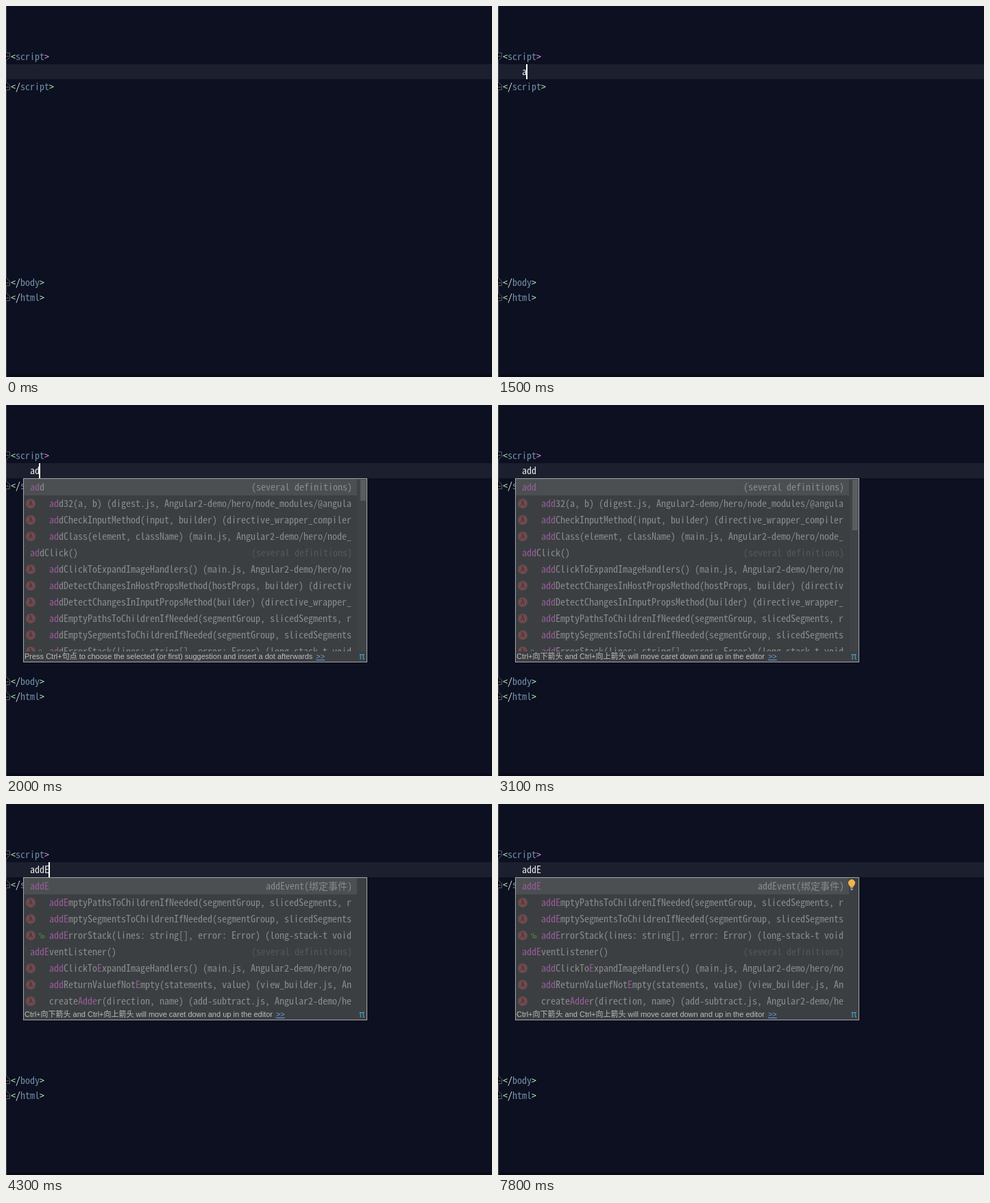
An HTML page that plays this animation: 709x542 px, repeating every 8000 ms.

```html
<!DOCTYPE html>
<html lang="en">
<head>
<meta charset="utf-8">
<title>Code completion</title>
<style>
html, body { margin: 0; width: 100%; height: 100%; overflow: hidden; background: #0c1020; }
#stage {
  position: relative; width: 709px; height: 542px; overflow: hidden; background: #0c1020;
  font: 14px "Noto Sans Mono CJK SC", "Liberation Mono", monospace; white-space: pre;
  font-size-adjust: ch-width 0.5;
}
#stage div, #stage svg { position: absolute; }
.anim, .list, .hint { animation: 8s step-end infinite; }

/* editor */
.current { left: 1px; top: 85px; width: 708px; height: 22px; background: #1c1f2e; }
.gutter { left: 0; top: 0; width: 1px; height: 542px; background: #4c4e55; }
.foot { left: 1px; top: 538px; width: 708px; height: 4px; background: #090b18; }
.line { left: 7px; height: 22px; line-height: 20px; color: #b2f0b0; }
.line b { font-weight: normal; color: #718da5; }
.line i { font-style: normal; color: #e4ece8; }
.line u { text-decoration: none; color: #f48bdd; }
.fold { left: 0; fill: #0c1020; stroke: #5a5c60; }
.typed {
  left: 35px; top: 85px; height: 22px; line-height: 20px; overflow: hidden;
  color: #e8e8e8; animation-name: typing;
}
.caret { left: 34px; top: 85px; width: 2px; height: 22px; background: #fff; animation-name: move, blink; }

/* popup */
.popup {
  left: 25px; top: 107px; width: 502px; height: 269px; box-sizing: border-box; overflow: hidden;
  border: 1px solid #a4a6a7; background: #3c3f41; animation-name: open;
}
.selected { left: 0; top: 0; width: 486px; height: 24px; background: #4b4f51; }
.track { left: 487px; top: 0; width: 13px; height: 252px; background: #404345; animation-name: track; }
.thumb { left: 491px; top: 1px; width: 8px; height: 25px; background: #5a5d5e; animation-name: thumb; }
.list { left: 0; top: 0; width: 486px; height: 252px; overflow: hidden; color: #8a8b8c; }
.row { left: 0; width: 486px; height: 24px; line-height: 22px; }
.row .name { left: 9px; }
.row.fn .name { left: 37px; }
.row b { font-weight: normal; color: #965c9a; }
.row .note { right: 7px; color: #55585a; }
.row:first-child .note { color: #8a8b8c; }
.icon {
  left: 3px; top: 5px; width: 14px; height: 14px; border-radius: 50%; background: #704a4e;
  color: #3a2c2f; font: 10px/14px "DejaVu Sans", sans-serif; text-align: center;
}
.icon.var { background: #8a682f; font-size: 8px; }
.icon.var::before {
  content: ""; position: absolute; left: -1px; top: -1px; width: 5px; height: 5px;
  border-radius: 50%; background: #8b8d8e;
}
.lock { left: 22px; top: 8px; fill: none; stroke: #4d7a45; }
.hints { left: 0; bottom: 0; width: 500px; height: 15px; background: #3c3f41; }
.hint {
  left: 1px; top: 0; color: #bcbcbc;
  font: 11px/15px "Liberation Sans", "Noto Sans CJK SC", "Noto Sans CJK", sans-serif;
}
.hint u { margin-left: 5px; color: #6a9fe8; }
.pi { left: 489px; top: 0; color: #4397c0; font: 14px/14px "DejaVu Sans", sans-serif; }
.bulb { left: 511px; top: 110px; animation-name: bulb; }

#list-a { animation-name: list-a; }
#list-ad { animation-name: list-ad; }
#list-add { animation-name: list-add; }
#list-addE { animation-name: list-addE; }
#hint-dot { animation-name: hint-dot; }
#hint-move { animation-name: hint-move; }

@keyframes typing {
  0% { width: 0; } 18.75% { width: 7px; } 25% { width: 14px; }
  28.75% { width: 21px; } 53.75%, 100% { width: 28px; }
}
@keyframes move {
  0% { left: 34px; } 18.75% { left: 41px; } 25% { left: 48px; }
  28.75% { left: 55px; } 53.75%, 100% { left: 62px; }
}
@keyframes blink {
  0%, 15%, 38.75%, 50%, 62.5%, 73.75%, 86.25%, 97.5%, 100% { opacity: 0; }
  10%, 18.75%, 45%, 53.75%, 67.5%, 80%, 91.25% { opacity: 1; }
}
@keyframes open {
  0% { opacity: 0; height: 269px; } 21.25% { opacity: 1; height: 269px; }
  53.75%, 100% { opacity: 1; height: 209px; }
}
@keyframes track { 0% { opacity: 1; } 53.75%, 100% { opacity: 0; } }
@keyframes thumb {
  0% { height: 25px; } 25% { height: 31px; } 28.75% { height: 74px; } 53.75%, 100% { height: 0; }
}
@keyframes list-a { 0% { opacity: 1; } 25%, 100% { opacity: 0; } }
@keyframes list-ad { 0%, 28.75%, 100% { opacity: 0; } 25% { opacity: 1; } }
@keyframes list-add { 0%, 53.75%, 100% { opacity: 0; } 28.75% { opacity: 1; } }
@keyframes list-addE { 0% { opacity: 0; } 53.75%, 100% { opacity: 1; } }
@keyframes hint-dot { 0% { opacity: 1; } 26.25%, 100% { opacity: 0; } }
@keyframes hint-move { 0% { opacity: 0; } 26.25%, 100% { opacity: 1; } }
@keyframes bulb { 0% { opacity: 0; } 60%, 100% { opacity: 1; } }
</style>
</head>
<body>
<div id="stage">
  <div class="current"></div>
  <div class="gutter"></div>
  <div class="foot"></div>
  <svg class="fold" style="top:67px" width="7" height="14"><path d="M0 1.5H5.5V8L0 13M0 6.5H4"/></svg>
  <svg class="fold" style="top:110px" width="7" height="14"><path d="M0 1L5.5 6V12.5H0M0 8.5H4"/></svg>
  <svg class="fold" style="top:396px" width="7" height="14"><path d="M0 1L5.5 6V12.5H0M0 8.5H4"/></svg>
  <svg class="fold" style="top:418px" width="7" height="14"><path d="M0 1L5.5 6V12.5H0M0 8.5H4"/></svg>
  <div class="line" style="top:63px">&lt;<b>script</b><u>&gt;</u></div>
  <div class="line" style="top:107px">&lt;<i>/</i><b>script</b>&gt;</div>
  <div class="line" style="top:393px">&lt;<i>/</i><b>body</b>&gt;</div>
  <div class="line" style="top:415px">&lt;<i>/</i><b>html</b>&gt;</div>
  <div class="typed anim">addE</div>
  <div class="caret anim"></div>

  <div class="popup anim">
    <div class="selected"></div>
    <div class="track anim"></div>
    <div class="thumb anim"></div>
    <div class="list" id="list-a"></div>
    <div class="list" id="list-ad"></div>
    <div class="list" id="list-add"></div>
    <div class="list" id="list-addE"></div>
    <div class="hints">
      <div class="hint" id="hint-dot">Press Ctrl+句点 to choose the selected (or first) suggestion and insert a dot afterwards<u>&gt;&gt;</u></div>
      <div class="hint" id="hint-move">Ctrl+向下箭头 and Ctrl+向上箭头 will move caret down and up in the editor<u>&gt;&gt;</u></div>
      <div class="pi">π</div>
    </div>
  </div>
  <svg class="bulb anim" width="11" height="17">
    <path d="M3 11.5L.8 8A5 5 0 1 1 9.2 8L7 11.5Z" fill="#f2b44c"/>
    <path d="M3 12.5H7M3 14.5H7M4 15.5H6" stroke="#a6a8a8"/>
  </svg>
</div>
<script>
const clickHandlers = "λ addClickToExpandImageHandlers() (main.js, Angular2-demo/hero/no";
const hostProps = "λ addDetectChangesInHostPropsMethod(hostProps, builder) (directiv";
const emptyRows = [
  "λ addEmptyPathsToChildrenIfNeeded(segmentGroup, slicedSegments, r",
  "λ addEmptySegmentsToChildrenIfNeeded(segmentGroup, slicedSegments",
  "λ addErrorStack(lines: string[], error: Error) (long-stack-t void"
];
const addRows = [
  "add",
  "λ add32(a, b) (digest.js, Angular2-demo/hero/node_modules/@angula",
  "λ addCheckInputMethod(input, builder) (directive_wrapper_compiler",
  "λ addClass(element, className) (main.js, Angular2-demo/hero/node_",
  "addClick()",
  clickHandlers
];
const longRows = [
  ...addRows, hostProps,
  "λ addDetectChangesInInputPropsMethod(builder) (directive_wrapper_",
  ...emptyRows
];
const lists = {
  a: [
    "a", "abs",
    "λ absoluteRedirect(segments) (apply_redirects.js, Angular2-demo/h",
    "v acorn (index.js, Angular2-demo/hero/node_modules/buble/src)",
    ...addRows, hostProps
  ],
  ad: longRows,
  add: longRows,
  addE: [
    "addE", ...emptyRows, "addEventListener()", clickHandlers,
    "λ addReturnValuefNotEmpty(statements, value) (view_builder.js, An",
    "λ createAdder(direction, name) (add-subtract.js, Angular2-demo/he"
  ]
};

// Marks the query as one run, or else its stem and its capital apart.
function mark(text, query) {
  const at = text.toLowerCase().indexOf(query.toLowerCase());
  if (at < 0) return text.replace(/^(add)(.*?)(E)/, "<b>$1</b>$2<b>$3</b>");
  const end = at + query.length;
  return `${text.slice(0, at)}<b>${text.slice(at, end)}</b>${text.slice(end)}`;
}

function rowHtml(entry, i, query) {
  const kind = /^[λv] /.test(entry) ? entry[0] : "";
  const text = kind ? entry.slice(2) : entry;
  const note = entry === "addE" ? "addEvent(绑定事件)" : "(several definitions)";
  const lock = text.startsWith("addErrorStack")
    ? '<svg class="lock" width="9" height="9"><path d="M.5 4V1.5H3.5V4M3 4.5H8V7.5H3ZM5.5 5V7"/></svg>' : "";
  const extra = kind
    ? `<div class="icon${kind === "v" ? " var" : ""}">${kind}</div>${lock}`
    : `<div class="note">${note}</div>`;
  return `<div class="row${kind ? " fn" : ""}" style="top:${i * 24}px">${extra}` +
    `<div class="name">${mark(text, query)}</div></div>`;
}

for (const [query, rows] of Object.entries(lists)) {
  document.getElementById("list-" + query).innerHTML =
    rows.map((entry, i) => rowHtml(entry, i, query)).join("");
}
</script>
</body>
</html>
```
